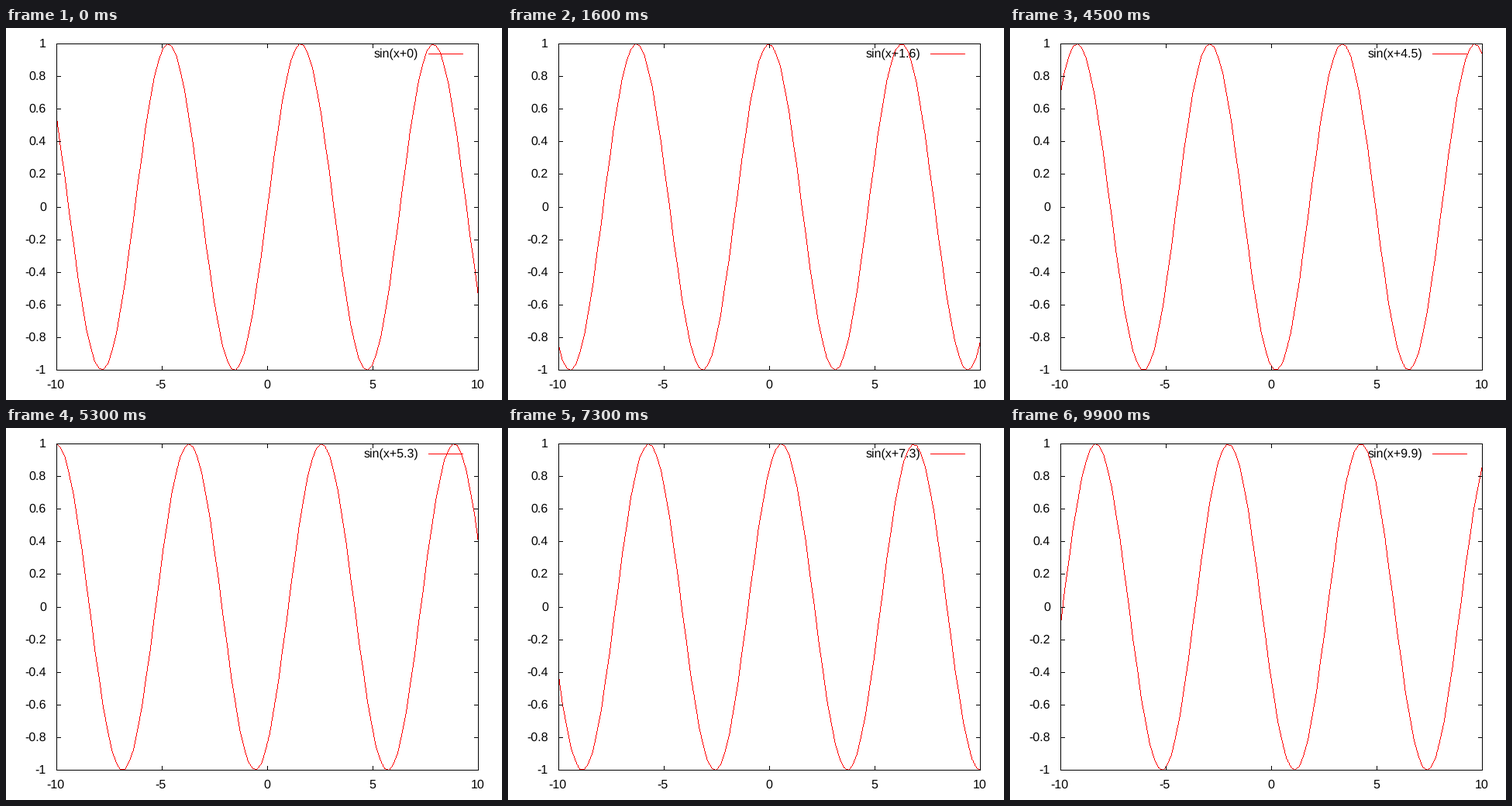
A matplotlib script for the animation above (10000 ms loop, 640 by 480 pixels).

```python
import numpy as np
import matplotlib.pyplot as plt
from matplotlib.animation import FuncAnimation

W, H, DPI = 640, 480, 100
LEFT, RIGHT, TOP, BOTTOM = 65, 609, 20, 441
TICK = 5
FRAMES, INTERVAL = 100, 100
RED, BLACK = (255, 0, 0, 255), (0, 0, 0, 255)

plt.rcParams["font.family"] = "Liberation Sans"
plt.rcParams["text.hinting"] = "none"

fig = plt.figure(figsize=(W / DPI, H / DPI), dpi=DPI, facecolor="white")
ax = fig.add_axes([0, 0, 1, 1])
ax.axis("off")


def to_px(x, y):
    """Plot coordinates to whole pixels."""
    px = LEFT + (x + 10) / 20 * (RIGHT - LEFT)
    py = BOTTOM - (y + 1) / 2 * (BOTTOM - TOP)
    return np.floor(px + 0.5).astype(int), np.floor(py + 0.5).astype(int)


def stroke(img, xs, ys, color):
    """One-pixel polyline without smoothing."""
    for x0, y0, x1, y1 in zip(xs, ys, xs[1:], ys[1:]):
        n = max(abs(x1 - x0), abs(y1 - y0)) + 1
        cols = np.rint(np.linspace(x0, x1, n)).astype(int)
        rows = np.rint(np.linspace(y0, y1, n)).astype(int)
        img[rows, cols] = color


def draw_border(img):
    stroke(img, [LEFT, RIGHT, RIGHT, LEFT, LEFT],
           [TOP, TOP, BOTTOM, BOTTOM, TOP], BLACK)
    for v in range(-10, 11, 5):
        x, _ = to_px(v, 0)
        stroke(img, [x, x], [BOTTOM, BOTTOM - TICK], BLACK)
        stroke(img, [x, x], [TOP, TOP + TICK], BLACK)
    for k in range(-5, 6):
        _, y = to_px(0, k / 5)
        stroke(img, [LEFT, LEFT + TICK], [y, y], BLACK)
        stroke(img, [RIGHT, RIGHT - TICK], [y, y], BLACK)


def label(x, y, s, ha):
    return ax.text(x, y, s, ha=ha, va="baseline", fontsize=16 * 72 / DPI,
                   color="black", zorder=2)


def render(phase):
    img = np.zeros((H, W, 4), np.uint8)
    stroke(img, [545, 589], [33, 33], RED)
    stroke(img, *to_px(xs, np.sin(xs + phase)), RED)
    draw_border(img)
    return img


xs = np.linspace(-10, 10, 100)
plot = ax.imshow(render(0), extent=(0, W, H, 0), aspect="auto",
                 interpolation="nearest", zorder=3)

for v in range(-10, 11, 5):
    label(to_px(v, 0)[0] - (1.5 if v < 0 else 0), 465, str(v), "center")
for k in range(-5, 6):
    label(52, to_px(0, k / 5)[1] + 5, f"{k / 5:g}", "right")
key = label(532, 38, "", "right")


def update(i):
    phase = i / 10
    plot.set_data(render(phase))
    key.set_text(f"sin(x+{phase:g})")
    return plot, key


anim = FuncAnimation(fig, update, frames=FRAMES, interval=INTERVAL,
                     repeat=True, repeat_delay=0)
plt.show()
```
